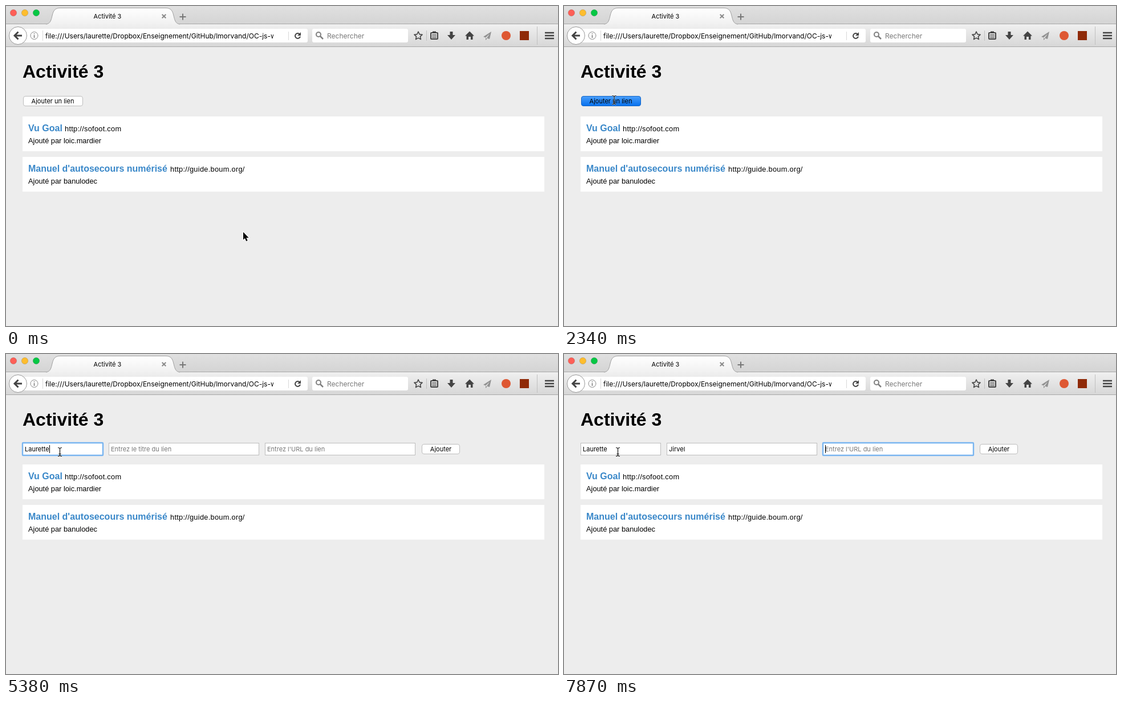
An HTML page for the animation above (8000 ms loop, 968 px wide and 562 px high).

```html
<!DOCTYPE html>
<html lang="fr">
<head>
<meta charset="utf-8">
<title>Activité 3</title>
<style>
html, body { margin: 0; width: 100%; height: 100%; overflow: hidden; background: #ededed; }
svg { display: block; }
text { font: 11px Inter, Roboto, sans-serif; white-space: pre; }
.bar { font-size: 12px; }
.hint { fill: #777; }
.mid { text-anchor: middle; }
.page text { font: 12.8px "Liberation Sans", Arial, sans-serif; }
.page .h1 { font-size: 32px; font-weight: bold; }
.page .link { font-size: 16px; font-weight: bold; fill: #3a88c9; }
.page .url { letter-spacing: .28px; }
.line { fill: none; stroke: #444; stroke-width: 2; }
.box { fill: #fff; stroke: #bdbdbd; }
.icon { fill: #444; }
</style>
</head>
<body>
<svg width="968" height="562" viewBox="0 0 968 562">
  <defs>
    <linearGradient id="strip" x2="0" y2="1"><stop stop-color="#e0e0e0"/><stop offset="1" stop-color="#d4d4d4"/></linearGradient>
    <linearGradient id="tools" x2="0" y2="1"><stop stop-color="#f0f0f0"/><stop offset="1" stop-color="#d7d7d7"/></linearGradient>
    <linearGradient id="tab" x2="0" y2="1"><stop stop-color="#fff"/><stop offset="1" stop-color="#f1f1f1"/></linearGradient>
    <linearGradient id="blue" x2="0" y2="1"><stop stop-color="#4a9ffb"/><stop offset="1" stop-color="#0670ee"/></linearGradient>
    <clipPath id="address"><path d="M68 40H469V64H68Z"/></clipPath>
  </defs>

  <!-- Browser window -->
  <rect width="968" height="32" fill="url(#strip)"/>
  <rect y="32" width="968" height="39" fill="url(#tools)"/>
  <path d="M0 31.5H968M0 71.5H968" stroke="#a8a8a8"/>
  <path d="M70 32C78 31 79 25 81 17C83 8 86 3.5 95 3.5H280C289 3.5 292 8 294 17C296 25 297 31 305 32" fill="url(#tab)" stroke="#a0a0a0"/>
  <g stroke-opacity=".15" stroke="#000">
    <circle cx="13" cy="12" r="5.7" fill="#ff5f57"/>
    <circle cx="33" cy="12" r="5.7" fill="#ffbd2e"/>
    <circle cx="53" cy="12" r="5.7" fill="#06c744"/>
  </g>
  <text class="mid" x="178" y="22">Activité 3</text>
  <path class="line" d="M273.7 14.7L280.3 21.3M280.3 14.7L273.7 21.3" style="stroke:#8a8a8a"/>
  <path class="line" d="M304.500 19H315.500M310 13.500V24.500" style="stroke:#777"/>

  <rect x="28" y="40" width="501" height="24" rx="3" fill="#fff"/>
  <rect x="537" y="40" width="168" height="24" rx="3" fill="#fff"/>
  <circle cx="21" cy="52" r="15.500" fill="#fff" stroke="#999"/>
  <path class="line" d="M28 52H15M21.500 45.500L15 52L21.500 58.500" style="stroke-width:3"/>
  <circle cx="49.500" cy="52" r="6.500" fill="none" stroke="#888"/>
  <path d="M49.500 48V49.500M49.500 51V56" stroke="#777" stroke-width="1.500"/>
  <path d="M64.500 43V61M495.500 45V60" stroke="#d8d8d8"/>
  <text class="bar" x="69" y="57" clip-path="url(#address)">file:///Users/laurette/Dropbox/Enseignement/GitHub/lmorvand/OC-js-w</text>
  <path class="line" d="M514.500 49A4.500 4.500 0 1 0 516 53.500"/>
  <path class="icon" d="M517 46V52H511Z"/>
  <circle class="line" cx="548" cy="50" r="4" style="stroke:#808080"/>
  <path class="line" d="M551 53L556 58" style="stroke:#808080;stroke-width:2.500"/>
  <text class="bar hint" x="563" y="57">Rechercher</text>

  <path id="star" class="line" style="stroke-width:1.600" stroke-linejoin="round"/>
  <rect class="line" x="745" y="47" width="12" height="11" rx="1"/>
  <path class="line" d="M748 46H754" style="stroke-width:3"/>
  <path class="line" d="M747 50.500H755M747 53H755M747 55.500H755" style="stroke-width:1"/>
  <path class="icon" d="M778.500 45H783.500V51H788L781 59L774 51H778.500Z"/>
  <path class="icon" d="M813 44.500L821 52.500H818.500V59H815V54H811V59H807.500V52.500H805Z"/>
  <path d="M851 45L837 54L841 55.500L848 49L843 56.500L848 58ZM841 56V60L843.500 57.500Z" fill="#929292"/>
  <circle cx="877" cy="52" r="8" fill="#de5833"/>
  <rect x="901" y="44" width="16" height="16" fill="#8f2a08"/>
  <path d="M737.500 43V61M931.500 36V68" stroke="#c0c0c0"/>
  <path class="line" d="M945 47H961M945 52H961M945 57H961" style="stroke-width:2.600"/>

  <!-- Page -->
  <g class="page">
    <text class="h1" x="29" y="126">Activité 3</text>
    <path d="M29 194H944V255H29ZM29 265H944V326H29Z" fill="#fff"/>
    <text class="link" x="39" y="220">Vu Goal</text>
    <text class="url" x="103" y="220">http://sofoot.com</text>
    <text x="39" y="241">Ajouté par loic.mardier</text>
    <text class="link" x="39" y="291">Manuel d'autosecours numérisé</text>
    <text class="url" x="288" y="291">http://guide.boum.org/</text>
    <text x="39" y="312">Ajouté par banulodec</text>
  </g>
  <g id="opener">
    <rect id="open" class="box" x="30.500" y="158.500" width="104" height="17" rx="3.500"/>
    <text class="mid" x="82" y="171">Ajouter un lien</text>
  </g>
  <g id="form">
    <g id="fields"></g>
    <rect class="box" x="729.500" y="158.500" width="66" height="17" rx="3.500"/>
    <text class="mid" x="762.500" y="171">Ajouter</text>
    <rect id="ring" y="156" height="22" rx="1" fill="none" stroke="#79b5f0" stroke-width="2.400"/>
    <rect id="caret" y="160" width="1" height="14"/>
  </g>
  <path id="arrow" d="M0 0V13.500L3 10.800L5.200 16L7.600 15L5.400 10H9.600Z" stroke="#fff" paint-order="stroke" stroke-width="1.600"/>
  <g id="beam" fill="none">
    <path d="M-3.500 -7.500Q0 -7.500 0 -5V5Q0 7.500 -3.500 7.500M3.500 -7.500Q0 -7.500 0 -5V5Q0 7.500 3.500 7.500M-2 3.500H2" stroke="#fff" stroke-width="2.400" stroke-opacity=".6"/>
    <path d="M-3.500 -7.500Q0 -7.500 0 -5V5Q0 7.500 -3.500 7.500M3.500 -7.500Q0 -7.500 0 -5V5Q0 7.500 3.500 7.500M-2 3.500H2" stroke="#111" stroke-width="1.200"/>
  </g>
</svg>
<script>
const LOOP = 8000;
const $ = id => document.getElementById(id);
const show = (id, on) => $(id).style.display = on ? '' : 'none';
const place = (id, x, y) => $(id).setAttribute('transform', `translate(${x} ${y})`);

const fields = [
  { x: 29, w: 141, hint: 'Entrez votre nom', value: 'Laurette', focus: 2990, blink: 3590,
    keys: [4130, 4490, 4610, 4790, 4910, 5030, 5210, 5380] },
  { x: 180, w: 264, hint: 'Entrez le titre du lien', value: 'Jirvel', focus: 5680, blink: 6280,
    keys: [6460, 6690, 6930, 7040, 7220, 7400] },
  { x: 454, w: 264, hint: "Entrez l'URL du lien", value: '', focus: 7870, blink: LOOP, keys: [] }
];
// The second letter is already there when its key time starts.
for (const f of fields) {
  $('fields').insertAdjacentHTML('beforeend',
    `<rect class="box" x="${f.x + .5}" y="156.5" width="${f.w - 1}" height="21"/><text x="${f.x + 4}" y="171"></text>`);
  f.label = $('fields').lastElementChild;
}

$('star').setAttribute('d', 'M' + Array.from({ length: 10 }, (_, i) => {
  const r = i % 2 ? 3.6 : 7.5, a = (i / 5 - .5) * Math.PI;
  return `${723 + r * Math.cos(a)} ${52.5 + r * Math.sin(a)}`;
}).join('L') + 'Z');

// Number of equal steps begun since a start time.
const steps = (t, start, count) => Math.max(0, Math.min(count, Math.floor((t - start) / 60) + 1));

function drawFields(t) {
  const active = fields.filter(f => t >= f.focus).pop();
  for (const f of fields) {
    f.typed = f.keys.filter(k => t >= k).length;
    f.label.textContent = f.typed ? f.value.slice(0, f.typed) : f.hint;
    f.label.classList.toggle('hint', !f.typed);
  }
  show('ring', active);
  show('caret', active && (t < active.blink || active.typed));
  if (!active) return;
  $('ring').setAttribute('x', active.x);
  $('ring').setAttribute('width', active.w);
  const width = active.typed ? active.label.getComputedTextLength() : 0;
  $('caret').setAttribute('x', active.x + 4 + Math.round(width));
}

function drawPointer(t) {
  const beam = t >= 2340;
  show('arrow', !beam);
  show('beam', beam);
  const left = 1 - steps(t, 1320, 12) / 12;
  place('arrow', Math.round(85 + 331 * left ** 1.5), Math.round(165 + 232 * left ** 2.3));
  const slide = steps(t, 2570, 3) / 3;
  place('beam', 88 + 6.5 * slide, 165 + 7 * slide);
}

function draw() {
  const t = performance.now() % LOOP;
  show('opener', t < 2400);
  show('form', t >= 2400);
  const pressed = t >= 2280;
  $('open').style.fill = pressed ? 'url(#blue)' : '';
  $('open').style.stroke = pressed ? '#1567c8' : '';
  drawFields(t);
  drawPointer(t);
  requestAnimationFrame(draw);
}
draw();
</script>
</body>
</html>
```
